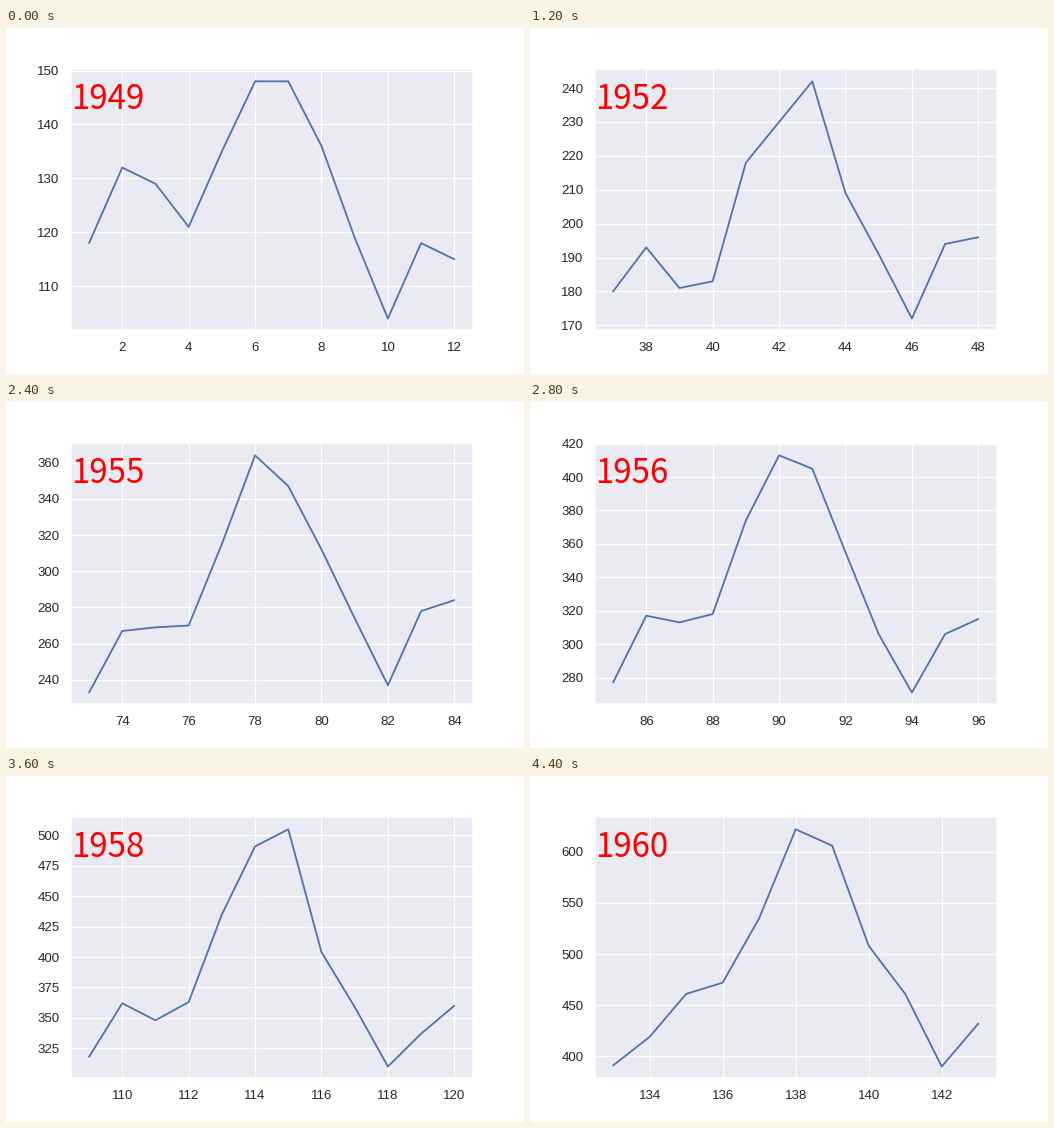
Animation, 518 px wide and 346 px high, one loop 4.8 s. Source, as a matplotlib script:

```python
import numpy as np
import matplotlib.pyplot as plt
from matplotlib.animation import FuncAnimation

W, H = 518, 346
DPI = 72           # one point is one pixel
SCALE = 1.2        # enlargement of all style sizes
FIRST_YEAR = 1949
MONTHS = 12

plt.rcParams.update({
    "font.family": "Liberation Sans",
    "axes.facecolor": "#EAEAF2",
    "axes.edgecolor": "white",
    "axes.linewidth": 1.25 * SCALE,
    "axes.grid": True,
    "axes.axisbelow": True,
    "grid.color": "white",
    "grid.linewidth": SCALE,
    "lines.solid_capstyle": "round",
})

# Monthly counts; sample 0 is the second month of the first year.
counts = np.array([
    118, 132, 129, 121, 135, 148, 148, 136, 119, 104, 118, 115,
    126, 141, 135, 125, 149, 170, 170, 158, 133, 114, 140, 145,
    150, 178, 163, 172, 178, 199, 199, 184, 162, 146, 166, 171,
    180, 193, 181, 183, 218, 230, 242, 209, 191, 172, 194, 196,
    196, 236, 235, 229, 243, 264, 272, 237, 211, 180, 201, 204,
    188, 235, 227, 234, 264, 302, 293, 259, 229, 203, 229, 242,
    233, 267, 269, 270, 315, 364, 347, 312, 274, 237, 278, 284,
    277, 317, 313, 318, 374, 413, 405, 355, 306, 271, 306, 315,
    301, 356, 348, 355, 422, 465, 467, 404, 347, 305, 336, 340,
    318, 362, 348, 363, 435, 491, 505, 404, 359, 310, 337, 360,
    342, 406, 396, 420, 472, 548, 559, 463, 407, 362, 405, 417,
    391, 419, 461, 472, 535, 622, 606, 508, 461, 390, 432,
])

fig = plt.figure(figsize=(W / DPI, H / DPI), dpi=DPI, facecolor="white")
left, right, top, bottom = 64.8, 466.56, 41.47, 302.4
ax = fig.add_axes([left / W, 1 - bottom / H,
                   (right - left) / W, (bottom - top) / H])
ax.tick_params(length=0, pad=9.5 * SCALE, labelsize=11 * SCALE,
               labelcolor="#262626")

line, = ax.plot([], [], color="#4C72B0", lw=1.5 * SCALE)
year = fig.text(65.5 / W, 1 - 81 / H, "", color="red", fontsize=33,
                family="Noto Sans CJK JP", va="baseline")


def draw(i):
    start = i * MONTHS
    y = counts[start:start + MONTHS]
    line.set_data(start + 1 + np.arange(len(y)), y)
    ax.relim()
    ax.autoscale_view()
    year.set_text(str(FIRST_YEAR + i))
    return line, year


anim = FuncAnimation(fig, draw, frames=12, interval=400,
                     init_func=lambda: draw(0), repeat=True, repeat_delay=0)
plt.show()
```
